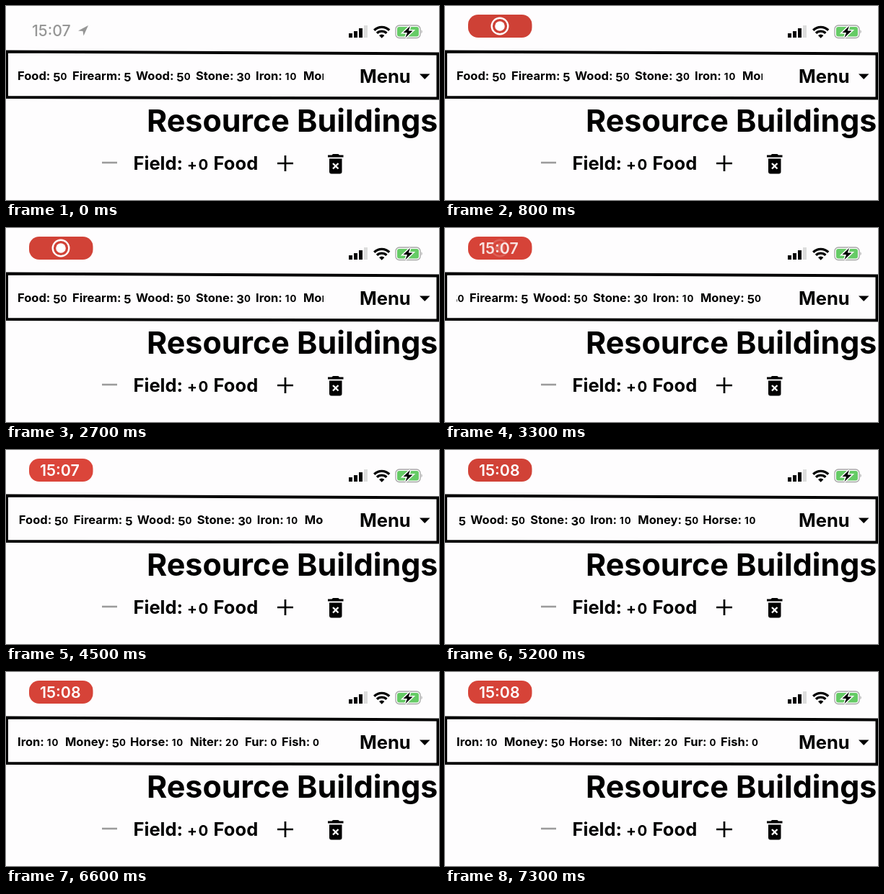
An HTML page for the animation above (7400 ms loop, 600 by 270 pixels).

```html
<!DOCTYPE html>
<html lang="en">
<head>
<meta charset="utf-8">
<title>Resource bar</title>
<style>
  html, body { margin: 0; width: 100%; height: 100%; overflow: hidden; background: #fefdfe; }
  svg { display: block; width: 600px; height: 270px; font-family: Inter, "Open Sans", sans-serif; font-weight: 700; }
  .small { font-size: .8em; letter-spacing: .07em; }
  .low { baseline-shift: -.12em; }
</style>
</head>
<body>
<svg viewBox="0 0 600 270">
  <defs><clipPath id="window"><rect x="16" y="80" width="424" height="36"/></clipPath></defs>

  <g id="page">
    <text x="195" y="175" font-size="43">Resource Buildings</text>
    <path d="M133 218h21" stroke="#9b9b9b" stroke-width="2.6"/>
    <text id="field" x="176.500" y="228" font-size="25.500"></text>
    <path d="M376 219h22M387 208v22" stroke="#000" stroke-width="2.7"/>
    <path d="M446 207.500h5.500l1.500-1.500h7.500l1.500 1.500h5.500v3h-21.500zM448 212.500h17.500v18q0 3-3 3h-11.500q-3 0-3-3z"/>
    <path d="M453 219l7.500 7.500m0-7.500l-7.500 7.500" stroke="#fff" stroke-width="2.4"/>
  </g>
  <rect id="shade" y="64" width="600" height="206"/>

  <rect width="600" height="65" fill="#fefdfe"/>
  <path id="panel" fill="#fefdfe" stroke="#000" stroke-width="4"/>
  <g clip-path="url(#window)"><g id="ticker" font-size="16.500"></g></g>
  <text x="490" y="107" font-size="25.500">Menu</text>
  <path id="arrow"/>
  <text id="back" x="205" y="159" font-size="28">Back to menu</text>

  <g id="clock" fill="#969696">
    <text x="36" y="42" font-size="21.300" font-weight="500">15:07</text>
    <path d="M100 34.500L114 27L107.500 41.500L106.500 35z"/>
  </g>
  <g id="pill">
    <rect id="pillBody" x="32" y="12" width="88.500" height="32" rx="14"/>
    <g id="record">
      <circle cx="76" cy="28" r="11.300" fill="none" stroke="#fff" stroke-width="2.400"/>
      <circle cx="76" cy="28" r="6.800" fill="#fff"/>
    </g>
    <text id="pillTime" x="47" y="36" font-size="21.300" font-weight="600" fill="#fff"></text>
  </g>

  <g id="status">
    <path d="M475 38h5v6h-5zM482 35h5v9h-5zM489 31h5v13h-5z"/>
    <path d="M496 27h5v17h-5z" fill="#dcdcdc"/>
    <g fill="none" stroke="#000" stroke-width="3.300">
      <path d="M510.200 33.700a15 15 0 0 1 21 0"/>
      <path d="M514 37.800a9.500 9.500 0 0 1 13.400 0"/>
    </g>
    <path d="M517 41a5.200 5.200 0 0 1 7.400 0L520.700 44.700z"/>
    <rect x="540" y="27" width="34" height="17.500" rx="5" fill="#fff" stroke="#a5a5a5" stroke-width="1.300"/>
    <rect x="542" y="29" width="30" height="13.500" rx="3" fill="#66cb66"/>
    <path d="M575.500 33q2.500 2.700 0 5.500z" fill="#a5a5a5"/>
    <path d="M560 28L550.500 37h5.500L553.500 44L563.500 34.500h-5.700z" stroke="#fff" stroke-width="3" paint-order="stroke"/>
  </g>
</svg>
<script>
const LOOP = 7400, STEP = 100;
const el = id => document.getElementById(id);
const set = (id, attrs) => { for (const k in attrs) el(id).setAttribute(k, attrs[k]); };
const mix = (a, b, p) => a + (b - a) * p;
const ease = p => p * p * (3 - 2 * p);
const ramp = (t, from, to) => ease(Math.min(1, Math.max(0, (t - from) / (to - from))));

// Old-style figures: small 0-2, descending 3-5, 7 and 9
const oldStyle = text => text
  .replace(/[+0-2]|[34579]/g, c => `<tspan class="${/[+0-2]/.test(c) ? "small" : "low"}">${c}</tspan>`);

const resources = [
  ["Food: 50", 17], ["Firearm: 5", 93], ["Wood: 50", 181], ["Stone: 30", 264], ["Iron: 10", 347],
  ["Money: 50", 413], ["Horse: 10", 503], ["Niter: 20", 586], ["Fur: 0", 662], ["Fish: 0", 713]
];
el("ticker").innerHTML = resources
  .map(([text, x]) => `<text x="${x - 1}" y="103">${oldStyle(text)}</text>`).join("");
el("field").innerHTML = oldStyle("Field: +0 Food");

// [time, offset] of the dragged resource list
const drag = [[0, 0], [2900, 0], [3300, -58], [3700, -332], [3900, -332], [4350, 3], [4700, 0],
  [4950, 0], [5500, -335], [5900, -332], [6300, -330], [LOOP, -330]];

function scrollAt(t) {
  const i = drag.findIndex(([time]) => time > t);
  const [t0, x0] = drag[i - 1], [t1, x1] = drag[i];
  return mix(x0, x1, ramp(t, t0, t1));
}

function draw(t) {
  const open = ramp(t, 1250, 1550) - ramp(t, 2100, 2400);
  const bottom = mix(127, 199.5, open);
  set("panel", { d: `M1 63.500L598.500 66.500V${bottom + 1.5}L1 ${bottom}z` });
  set("arrow", { d: open > 0.5 ? "M573 101h14.500l-7.250-7.500z" : "M573 94.500h14.500l-7.250 7.500z" });
  set("back", { opacity: open });
  set("shade", { opacity: 0.19 * open });
  el("page").style.filter = open ? `blur(${1.8 * open}px)` : "none";

  set("ticker", { transform: `translate(${scrollAt(t)})` });

  const pill = ramp(t, 100, 500), time = ramp(t, 3000, 3400);
  const glow = 0.5 + 0.5 * Math.cos((t - 1950) / 1000 * Math.PI);
  set("clock", { opacity: 1 - pill });
  set("pill", { opacity: pill });
  set("pillBody", { fill: `rgb(${mix(204, 240, glow)},${mix(64, 75, glow)},${mix(53, 64, glow)})` });
  set("record", { opacity: 1 - time });
  set("pillTime", { opacity: time });
  el("pillTime").textContent = t < 5100 ? "15:07" : "15:08";
}

function tick() {
  draw(Math.floor(performance.now() % LOOP / STEP) * STEP);
  requestAnimationFrame(tick);
}
tick();
</script>
</body>
</html>
```
